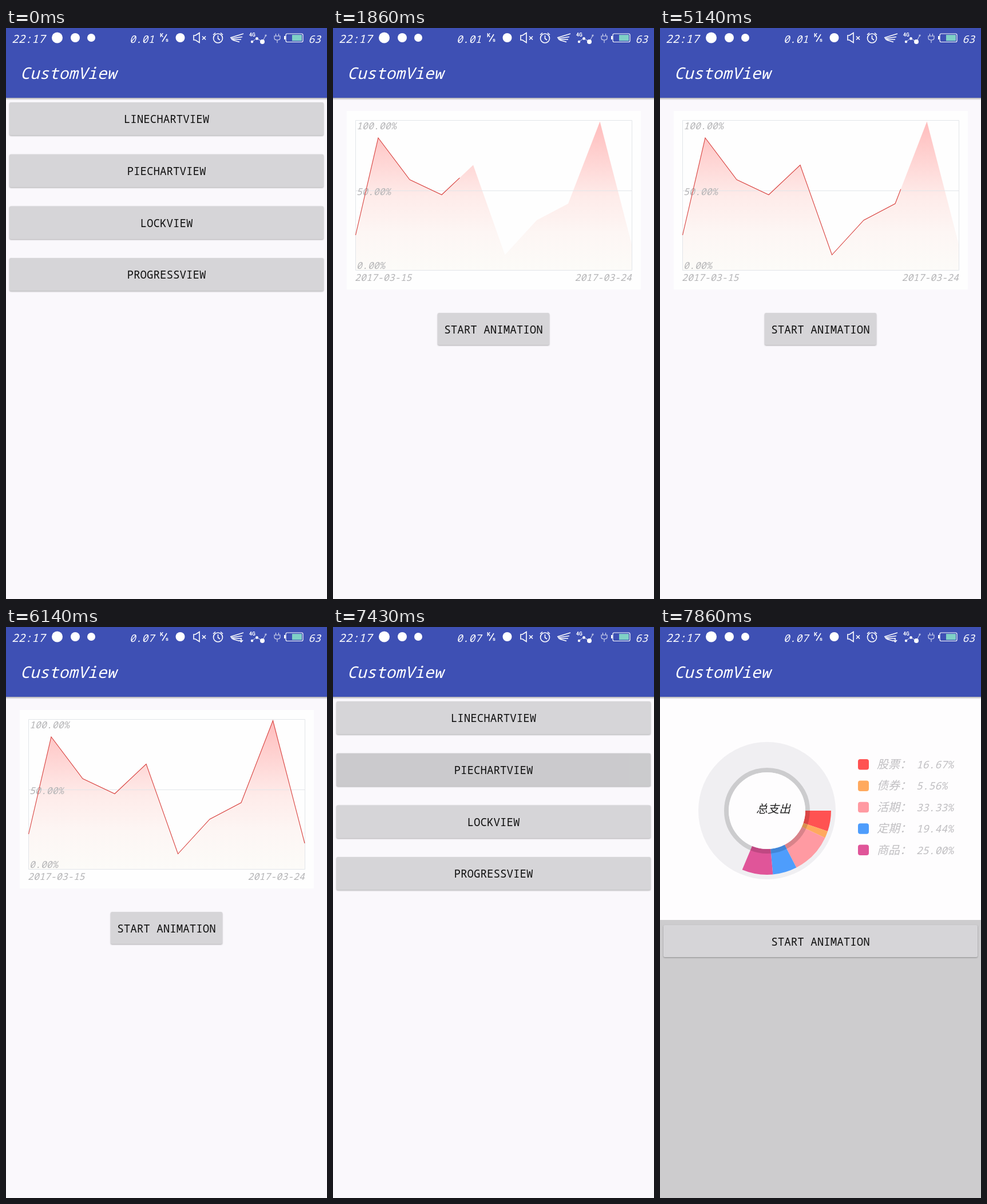
Write an HTML page that moves like this. It is 561 by 998 pixels and loops after 8 s.

```html
<!DOCTYPE html>
<html lang="en">
<head>
<meta charset="utf-8">
<title>CustomView</title>
<style>
  html, body { margin: 0; width: 100%; height: 100%; overflow: hidden; background: #faf8fc; }
  svg { display: block; width: 561px; height: 998px; }
  text { font: italic 300 16.6px "Noto Sans Mono", "Noto Sans CJK SC", "Noto Sans CJK", monospace; white-space: pre; }
  .bar text { font-size: 28px; fill: #fff; }
  .key rect { fill: #d6d5d8; filter: drop-shadow(0 1px 1px rgba(0,0,0,.32)); }
  .key text { font-size: 19.2px; font-style: normal; text-anchor: middle; fill: #111; }
  .status text { font-size: 19.5px; fill: #fff; }
  .status .net { font-size: 18px; }
  .status .tiny { font: 700 9.5px Roboto, sans-serif; }
  .status path, .status .ring { fill: none; stroke: #fff; stroke-width: 1.6; }
  .dot { fill: #fff; }
  .axis { fill: none; stroke: #e2e5e9; }
  .labels text { fill: #b4b4b6; }
  .legend text { font-size: 18px; fill: #c0bfc2; }
  .legend .name { font-size: 20px; }

  /* One shared 8 s clock: 1% = 80 ms */
  .chart, .pie, .trace, .arc, .touch, .touched rect, .hold1, .hold2, .before, .after, .busy, .dim {
    animation: 8s linear infinite;
  }
  .chart, .pie { animation-timing-function: cubic-bezier(.22,1,.36,1); }
  .touch, .before, .after, .busy { animation-timing-function: step-end; }
  .chart { animation-name: chart; }
  .pie { animation-name: pie; }
  .trace { fill: none; stroke: #d8403d; stroke-width: 1.1; stroke-dasharray: 1 2; animation-name: trace; }
  .arc { fill: none; stroke-width: 45; animation-name: arc; }
  .touch { fill: rgba(247,248,251,.85); stroke: #b3bedb; stroke-width: 2; animation-name: touch; }
  .touched rect { animation-name: lift; }
  .hold1 { animation-name: hold1; }
  .hold2 { animation-name: hold2; }
  .before { animation-name: before; }
  .after { animation-name: after; }
  .busy { animation-name: busy; }
  .dim { animation-name: dim; }

  @keyframes chart {
    0%, 14.41% { transform: translateX(561px); }
    18.79%, 80.54% { transform: translateX(0); }
    84.91%, 100% { transform: translateX(561px); }
  }
  @keyframes pie {
    0%, 93.85% { transform: translateX(561px); }
    98.22%, 100% { transform: translateX(0); }
  }
  @keyframes trace {
    0%, 14.75% { stroke-dashoffset: 1; }
    39.75%, 47.24% { stroke-dashoffset: 0; }
    47.25% { stroke-dashoffset: 1; }
    72.25%, 100% { stroke-dashoffset: 0; }
  }
  @keyframes arc {
    0%, 94.19% { stroke-dasharray: 0 0 0 200; }
    100% { stroke-dasharray: var(--span); }
  }
  @keyframes touch {
    0% { opacity: 0; transform: translate(330px, 162px); }
    10.7% { opacity: 1; transform: translate(330px, 162px); }
    12.4% { opacity: 0; transform: translate(330px, 162px); }
    46.2% { opacity: 1; transform: translate(327.5px, 551.5px); }
    47.25% { opacity: 0; transform: translate(327.5px, 551.5px); }
    91% { opacity: 1; transform: translate(330px, 252px); }
    92.8%, 100% { opacity: 0; transform: translate(330px, 252px); }
  }
  @keyframes lift {
    0%, 46% { filter: drop-shadow(0 1px 1px rgba(0,0,0,.32)); }
    46.3%, 47.25% { filter: drop-shadow(0 3px 3px rgba(0,0,0,.36)); }
    48.2%, 100% { filter: drop-shadow(0 1px 1px rgba(0,0,0,.32)); }
  }
  @keyframes hold1 { 0%, 10.7% { opacity: 0; } 12%, 17% { opacity: .05; } 19%, 100% { opacity: 0; } }
  @keyframes hold2 { 0%, 91% { opacity: 0; } 92.5%, 100% { opacity: .05; } }
  @keyframes before { 0% { opacity: 1; } 75%, 100% { opacity: 0; } }
  @keyframes after { 0% { opacity: 0; } 75%, 100% { opacity: 1; } }
  @keyframes busy {
    0% { opacity: 0; } 38% { opacity: 1; } 48% { opacity: 0; }
    76.7% { opacity: 1; } 84% { opacity: 0; } 97.5%, 100% { opacity: 1; }
  }
  @keyframes dim { 0%, 93.8% { opacity: 0; } 94.5%, 100% { opacity: .014; } }
</style>
</head>
<body>
<svg viewBox="0 0 561 998">
  <defs>
    <linearGradient id="blush" gradientUnits="userSpaceOnUse" x1="0" y1="163" x2="0" y2="423">
      <stop offset="0" stop-color="#ffbcbc"/>
      <stop offset=".5" stop-color="#feebe9"/>
      <stop offset=".75" stop-color="#fdf6f4"/>
      <stop offset="1" stop-color="#fcfbf8"/>
    </linearGradient>
    <linearGradient id="shade" x2="0" y2="1">
      <stop offset="0" stop-opacity=".3"/>
      <stop offset="1" stop-opacity="0"/>
    </linearGradient>
    <g id="bar" class="bar">
      <rect width="561" height="122" fill="#3e50b4"/>
      <rect y="122" width="561" height="4" fill="url(#shade)"/>
      <text x="25" y="89">CustomView</text>
    </g>
  </defs>

  <g id="menu"></g>

  <g class="chart">
    <rect width="561" height="998" fill="#faf8fc"/>
    <rect x="24" y="145" width="514" height="312" fill="#fefefe"/>
    <path id="area" fill="url(#blush)"/>
    <path class="axis" d="M39.5 161.5H522.5V423.5H39.5ZM39.5 284.5H522.5"/>
    <g class="labels">
      <text x="41" y="177">100.00%</text>
      <text x="41" y="292">50.00%</text>
      <text x="41" y="421">0.00%</text>
      <text x="38" y="442">2017-03-15</text>
      <text x="522" y="442" text-anchor="end">2017-03-24</text>
    </g>
    <path id="trace" class="trace" pathLength="1"/>
    <g id="chartKey" class="touched"></g>
    <use href="#bar"/>
  </g>

  <g class="pie">
    <rect width="561" height="998" fill="#cdccce"/>
    <rect width="561" height="512" fill="#fefdfe"/>
    <circle cx="187" cy="321" r="120" fill="#f0eff2"/>
    <g id="arcs"></g>
    <circle cx="187" cy="321" r="71" fill="none" stroke="#000" stroke-opacity=".15" stroke-width="8"/>
    <circle cx="187" cy="321" r="67" fill="#fefdfe"/>
    <text x="198" y="325" text-anchor="middle" style="font-size:20px" fill="#222">总支出</text>
    <g id="legend" class="legend"></g>
    <g id="pieKey"></g>
    <use href="#bar"/>
  </g>

  <g class="status">
    <text x="10" y="26">22:17</text>
    <circle class="dot" cx="89.5" cy="17" r="9.5"/>
    <circle class="dot" cx="121" cy="17" r="8"/>
    <circle class="dot" cx="149" cy="17" r="7"/>
    <text class="net before" x="216" y="26">0.01</text>
    <text class="net after" x="216" y="26">0.07</text>
    <text class="tiny" x="269" y="16">K</text>
    <text class="tiny" x="279" y="24">s</text>
    <path d="M281 11L273 24" stroke-width="1"/>
    <circle class="dot" cx="304.5" cy="17" r="8"/>
    <path d="M328 13H331L338 8.5V25.5L331 21H328ZM343 14.5L349 20.5M349 14.5L343 20.5"/>
    <circle class="ring" cx="370.5" cy="18" r="8"/>
    <path d="M370.5 13V18.5L374 21M362 12L366 8.5M379 12L375 8.5"/>
    <path d="M392 17L415 10M393 18.5L413 15.5M394 20L411 20M396 21L408 24.5" stroke-width="2.4"/>
    <path class="busy" d="M411 19V26M408 23L411 26L414 23"/>
    <text class="tiny" x="425" y="15" style="font-size:8.5px">4G</text>
    <path d="M430 24L438 18L448 24L454 13" style="stroke-width:.8"/>
    <circle class="dot" cx="430" cy="24" r="2.2"/>
    <circle class="dot" cx="438.5" cy="18.5" r="2.4"/>
    <circle class="dot" cx="448" cy="24" r="4"/>
    <circle class="dot" cx="454" cy="13" r="1.8" opacity=".5"/>
    <path d="M469 14H479V18Q479 21 474 21Q469 21 469 18ZM471.5 14V10M476.5 14V10M474 21V26" style="stroke-width:1.1" opacity=".8"/>
    <rect class="ring" x="489" y="10" width="30" height="14.5" rx="2.5" style="stroke-width:1.2"/>
    <rect class="dot" x="486" y="14" width="2.5" height="6"/>
    <rect x="500" y="12" width="17" height="10.5" fill="#7fd0c6"/>
    <text class="net" x="528.5" y="26">63</text>
  </g>

  <circle class="touch" r="17"/>
</svg>
<script>
  const put = (id, markup) => { document.getElementById(id).innerHTML = markup; };

  const key = (x, y, w, h, label, hold) => `<g class="key">
    <rect x="${x}" y="${y}" width="${w}" height="${h}" rx="2.5"/>
    ${hold ? `<path class="${hold}" opacity="0" d="M${x} ${y}h${w}v${h}h${-w}z"/>` : ''}
    <text x="${x + w / 2}" y="${y + h / 2 + 7.5}">${label}</text></g>`;

  const views = ['LINECHARTVIEW', 'PIECHARTVIEW', 'LOCKVIEW', 'PROGRESSVIEW'];
  put('menu', views.map((name, i) =>
    key(6, 130 + i * 90.7, 549, 57.5, name, ['hold1', 'hold2'][i])).join('') +
    '<use href="#bar"/><rect class="dim" width="561" height="998"/>');
  put('chartKey', key(183, 498, 195, 56, 'START ANIMATION'));
  put('pieKey', key(6, 521, 549, 56, 'START ANIMATION'));

  const points = [[39.5, 362], [79, 192], [134, 265], [190, 291.5], [245, 239.5],
    [300.5, 396.5], [356, 336], [411, 307], [466.5, 163.5], [522, 378]];
  const line = 'M' + points.join('L');
  document.getElementById('trace').setAttribute('d', line);
  document.getElementById('area').setAttribute('d', line + 'V423H39.5Z');

  const shares = [['股票', 16.67, '#ff5252'], ['债券', 5.56, '#ffa95e'], ['活期', 33.33, '#ff9aa2'],
    ['定期', 19.44, '#4e9dfc'], ['商品', 25, '#e05599']];
  const reached = 0.447; // part of the sweep done when the loop ends
  let start = 0;
  let arcs = '', legend = '';
  shares.forEach(([name, share, color], i) => {
    const y = 231 + i * 37.4;
    arcs += `<circle class="arc" cx="187" cy="321" r="89.5" pathLength="100" stroke="${color}"
      style="--span: 0 ${start * reached} ${share * reached} 200"/>`;
    legend += `<rect x="346" y="${y}" width="19" height="18.5" rx="4" fill="${color}"/>
      <text class="name" x="379" y="${y + 16}">${name}：</text>
      <text x="448" y="${y + 16}">${share.toFixed(2)}%</text>`;
    start += share;
  });
  put('arcs', arcs);
  put('legend', legend);
</script>
</body>
</html>
```
